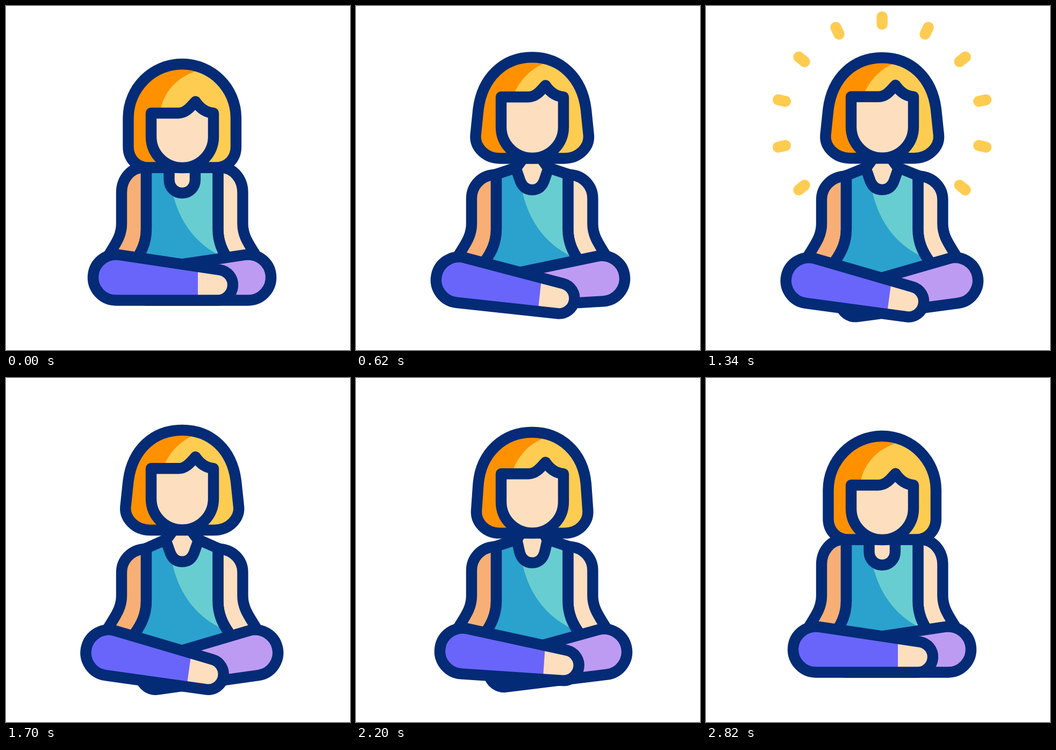
Animation, 640 px wide and 640 px high, one loop 3.6 s. Source, as an HTML page with a canvas:

```html
<!DOCTYPE html>
<html lang="en">
<head>
<meta charset="utf-8">
<title>Meditation</title>
<style>
  html, body { margin: 0; width: 100%; height: 100%; overflow: hidden; background: #fff; }
  canvas { display: block; width: 640px; height: 640px; }
</style>
</head>
<body>
<canvas id="stage" width="640" height="640"></canvas>
<script>
const ctx = document.getElementById('stage').getContext('2d');
const LOOP = 3600, STEP = 20, MIRROR = 655.4, LINE = 20.4;
const NAVY = '#042b76', SKIN = '#fddfbf', SHADED_SKIN = '#f8af75', YELLOW = '#ffcc52',
      ORANGE = '#ff9100', TEAL = '#68cdd1', BLUE = '#2aa2cd', VIOLET = '#6965fa', LILAC = '#bd9bf3';

const TIMES = [120, 320, 620, 960, 1700, 2200, 2800];
const KEYS = {
  rise:       [0, .43, 1, 1, 1.03, .7, 0],
  shoulder:   [0, .45, 1, 1.05, 1.3, 1, 0],
  crown:      [108, 103, 95.4, 95.8, 97, 101, 108],
  frontX:     [204.5, 200.5, 191.5, 191.5, 191, 198.5, 204.5],
  frontY:     [505, 506.5, 509.5, 510.5, 511, 508, 505],
  frontAngle: [0, 2.05, 6.2, 7, 8, 3.8, 0],
  backX:      [204.9, 204.9, 197.9, 191.9, 191.9, 193.9, 204.9],
  backY:      [505, 505, 507, 510, 511, 509.5, 505],
  backAngle:  [0, 0, 3.3, 6.5, 8, 7, 0]
};

const clamp = (v, lo = 0, hi = 1) => Math.min(hi, Math.max(lo, v));

// Monotone cubic interpolation through the pose keys
function sample(values, time) {
  const last = TIMES.length - 1;
  const t = clamp(time, TIMES[0], TIMES[last]);
  let i = 0;
  while (i < last - 1 && t > TIMES[i + 1]) i++;
  const slope = k => (values[k + 1] - values[k]) / (TIMES[k + 1] - TIMES[k]);
  const tangent = k => {
    if (k === 0) return slope(0) * .5;
    if (k === last) return slope(last - 1) * .5;
    const a = slope(k - 1), b = slope(k);
    return a * b <= 0 ? 0 : 2 * a * b / (a + b);
  };
  const span = TIMES[i + 1] - TIMES[i], u = (t - TIMES[i]) / span;
  const ease = u * u * (3 - 2 * u);
  return values[i] * (1 - ease) + values[i + 1] * ease
    + span * u * (1 - u) * (tangent(i) * (1 - u) - tangent(i + 1) * u);
}

// Mixes two path strings that share the same commands
function blend(from, to, amount) {
  const ends = to.match(/-?[\d.]+/g);
  let i = 0;
  return from.replace(/-?[\d.]+/g, n => +n + (ends[i++] - n) * amount);
}

function patch(d, fill) {
  ctx.fillStyle = fill;
  ctx.fill(new Path2D(d));
}

function shape(d, fill, decorate) {
  const path = new Path2D(d);
  ctx.fillStyle = fill;
  ctx.fill(path);
  if (decorate) {
    ctx.save();
    ctx.clip(path);
    decorate();
    ctx.restore();
  }
  ctx.lineWidth = LINE;
  ctx.strokeStyle = NAVY;
  ctx.stroke(path);
}

function mirrored(draw) {
  ctx.save();
  ctx.translate(MIRROR, 0);
  ctx.scale(-1, 1);
  draw();
  ctx.restore();
}

function rays(t) {
  const alpha = Math.min(clamp((t - 640) / 160), clamp((1640 - t) / 200));
  if (!alpha) return;
  const tip = 199.5 - 5.5e-5 * Math.max(0, 1481 - t) ** 2;
  ctx.save();
  ctx.globalAlpha = alpha;
  ctx.strokeStyle = YELLOW;
  ctx.lineWidth = LINE;
  ctx.translate(327.6, 218.5);
  for (let i = -5; i <= 5; i++) {
    ctx.save();
    ctx.rotate(i * Math.PI / 7);
    ctx.beginPath();
    ctx.moveTo(0, -tip);
    ctx.lineTo(0, 14 - tip);
    ctx.stroke();
    ctx.restore();
  }
  ctx.restore();
}

function arm(amount, fill) {
  const side = 'L261 415 C261 440 252 458 240 475 L235 490 L190 490 L190 465 C204 442 215 428 215 405 Z';
  shape(blend(
    'M215 347 C215 322 232 300.5 256 300.5 L261 300.5' + side,
    'M215 358 C215 335 232 316 256 314 L261 313' + side, amount), fill);
}

function torso({ rise, shoulder }) {
  const hem = 'L394.4 415 C394.4 440 403.4 458 415.4 475 L415 518 L240 518 L240 475 C252 458 261 440 261 415 Z';
  shape(blend(
    'M261 300.5 L303 300.5 L352.4 300.5 L394.4 300.5' + hem,
    'M261 313 L300 300 L355.4 300 L394.4 313' + hem, shoulder), TEAL,
    () => patch('M304 280 L304 300 C307 382 344 442 410 470 L410 520 L230 520 L230 280 Z', BLUE));
  shape(blend(
    'M303.5 300 L303.5 323.5 C303.5 337 314 348 327.7 348 C341.4 348 351.9 337 351.9 323.5 L351.9 300 L351.9 280 L303.5 280 Z',
    'M297.5 302 L304 321 C308 335 316 342 327.7 342 C339.4 342 347.4 335 351.4 321 L357.9 302 L340.4 278 L315 278 Z',
    rise), SKIN);
}

function head({ rise, crown }) {
  const hair = blend(
    `M227.5 208.5 C227.5 153 272.5 ${crown} 327.7 ${crown} C382.9 ${crown} 427.9 153 427.9 208.5
     L427.9 262 C427.9 284 412.4 300.5 390.4 300.5 L265 300.5 C243 300.5 227.5 284 227.5 262 Z`,
    `M227.5 192 C235 133 275 ${crown} 327.7 ${crown} C380.4 ${crown} 420.4 133 427.9 192
     L432.9 241 C434.4 262 415.4 283.5 387.4 283.5 L268 283.5 C240 283.5 221 262 222.5 241 Z`, rise);
  shape(hair, YELLOW, () => patch(blend(
    'M357 120 C318 132 292 160 286 200 L286 320 L200 320 L200 70 L357 70 Z',
    'M352 106 C324 117 302 140 291 171 L291 320 L200 320 L200 70 L352 70 Z', rise), ORANGE));

  const brow = 199.2 - 30 * rise, jaw = 243 - 18 * rise;
  shape(`M270 ${jaw} V${brow} H321 C335 ${brow} 344 ${brow - 12} 352.5 ${brow - 21.5}
    C361 ${brow - 9} 371 ${brow - 1} 386 ${brow} V${jaw} A58 58 0 0 1 270 ${jaw} Z`, SKIN);
}

function leg(x, y, degrees, fill) {
  ctx.save();
  ctx.translate(x, y);
  ctx.rotate(degrees * Math.PI / 180);
  // Two round ends joined by their common tangents
  const tilt = 2 * Math.atan2(14, 189), sin = Math.sin(tilt), cos = Math.cos(tilt);
  const edge = (cx, cy, r) => `${cx + r * sin} ${cy - r * cos}`;
  shape(`M0 42.5 A42.5 42.5 0 1 1 ${edge(0, 0, 42.5)} L${edge(189, 14, 28.5)}
    A28.5 28.5 0 0 1 189 42.5 Z`, fill,
    () => patch('M152.5 -60 H240 V60 H152.5 Z', SKIN));
  ctx.restore();
}

function render(t) {
  const pose = {};
  for (const name in KEYS) pose[name] = sample(KEYS[name], t);
  ctx.fillStyle = '#fff';
  ctx.fillRect(0, 0, 640, 640);
  ctx.lineCap = ctx.lineJoin = 'round';
  rays(t);
  arm(pose.shoulder, SHADED_SKIN);
  mirrored(() => arm(pose.shoulder, SKIN));
  torso(pose);
  head(pose);
  mirrored(() => leg(pose.backX, pose.backY, pose.backAngle, LILAC));
  leg(pose.frontX, pose.frontY, pose.frontAngle, VIOLET);
}

const start = performance.now();
function tick() {
  const t = (performance.now() - start) % LOOP;
  render(Math.floor(t / STEP) * STEP);
  requestAnimationFrame(tick);
}
tick();
</script>
</body>
</html>
```
